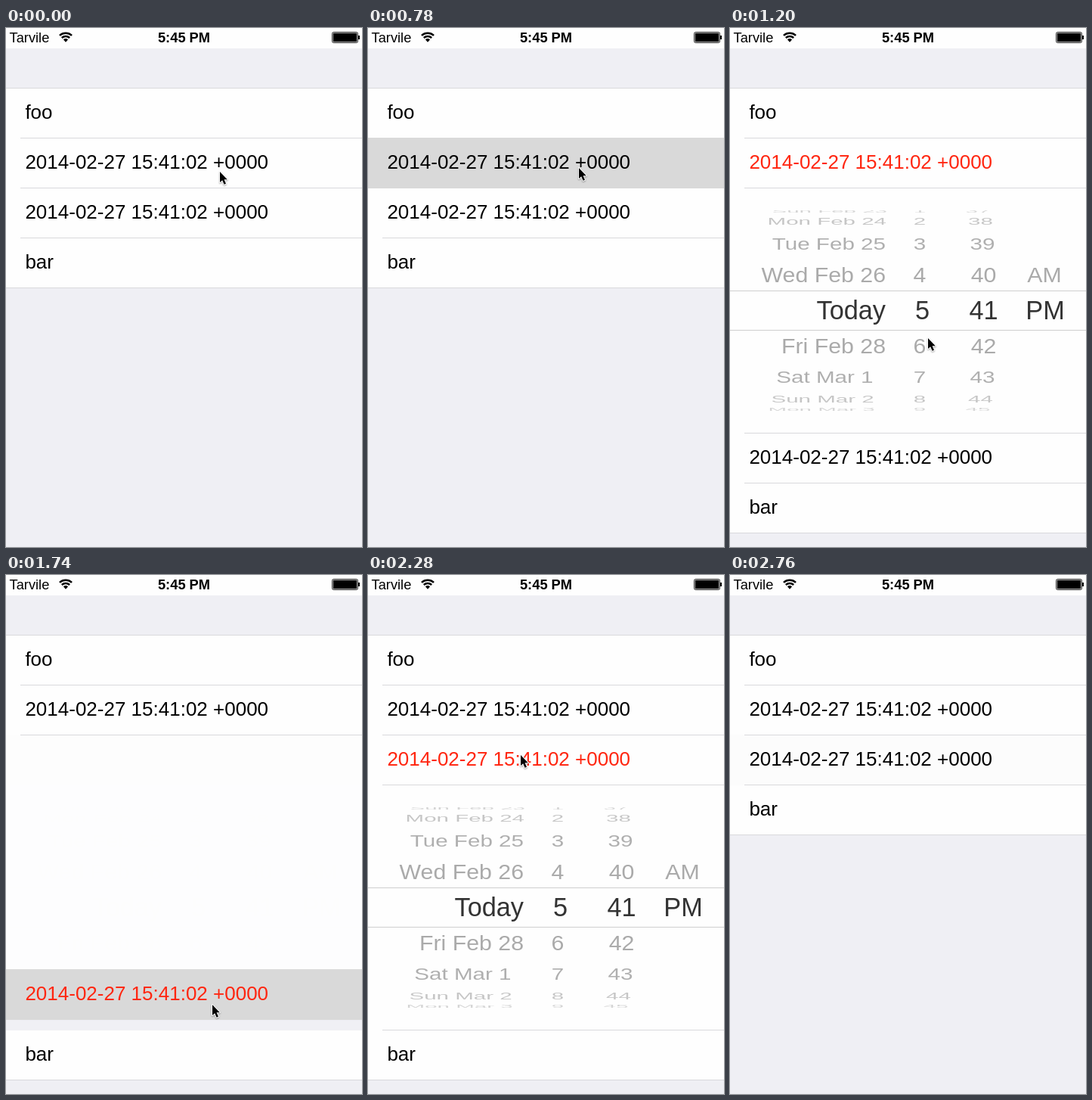
An HTML page with a canvas for the animation above (3.22 s loop, 471 by 686 pixels).

```html
<!DOCTYPE html>
<html lang="en">
<head>
<meta charset="utf-8">
<title>Inline date picker</title>
<style>
  html, body { margin: 0; width: 100%; height: 100%; overflow: hidden; background: #efeff4; }
  canvas { display: block; }
</style>
</head>
<body>
<canvas id="stage" width="471" height="686"></canvas>
<script>
const ctx = document.getElementById('stage').getContext('2d');
const LOOP = 3220, STEP = 60, W = 471, H = 686;
const ROW = 66, PICKER = 324, CELL = '#fefefe', LINE = '#d9d9dc';
const FONT = '"Liberation Sans", Arial, sans-serif';
const DATE = '2014-02-27 15:41:02 +0000';

// Each key is [time, ...values]
const CURSOR = [
  [0, 283, 190], [60, 279, 185], [840, 279, 185], [1200, 262, 410], [1500, 273, 568],
  [1740, 273, 568], [1800, 262, 534], [1860, 240, 426], [2280, 202, 238],
  [2460, 202, 238], [2700, -20, 290]
];
const GLOW_FIRST = [[779, 0], [780, 1], [840, 1], [1140, 0]];
const GLOW_SECOND = [
  [1619, 0], [1620, 1], [1740, 1], [1860, .1], [1920, 0], [2459, 0], [2460, 1], [2760, .05]
];

const WHEEL = [
  ['Sun Feb 23', 1, 37], ['Mon Feb 24', 2, 38], ['Tue Feb 25', 3, 39], ['Wed Feb 26', 4, 40, 'AM'],
  ['Today', 5, 41, 'PM'],
  ['Fri Feb 28', 6, 42], ['Sat Mar 1', 7, 43], ['Sun Mar 2', 8, 44], ['Mon Mar 3', 9, 45]
];
// Indexed by distance from the selected row
const WHEEL_ALPHA = [.8, .33, .31, .22, .16];
const WHEEL_SIZE = [34.3, 30.3, 29.6, 29.5, 29.5];
const MINUTE_X = [335.5, 335.5, 334, 331.5, 328];

function tween(keys, t) {
  const i = keys.findIndex(k => k[0] > t);
  if (i < 0) return keys[keys.length - 1].slice(1);
  if (i === 0) return keys[0].slice(1);
  const a = keys[i - 1], b = keys[i], f = (t - a[0]) / (b[0] - a[0]);
  return a.slice(1).map((v, j) => v + (b[j + 1] - v) * f);
}

function ease(t, start) {
  const x = Math.min(1, Math.max(0, (t - start) / 280));
  return x * x * (3 - 2 * x);
}

function box(x, y, w, h, color) {
  ctx.fillStyle = color;
  ctx.fillRect(x, y, w, h);
}

function text(str, x, y, size, color, align = 'left', weight = '') {
  ctx.font = `${weight} ${size}px ${FONT}`;
  ctx.textAlign = align;
  ctx.fillStyle = color;
  ctx.fillText(str, x, y);
}

function row(label, top, color = '#000', glow = 0, inset = 19) {
  box(0, top, W, ROW, CELL);
  box(inset, top + ROW - 1, W - inset, 1, LINE);
  if (glow) box(0, top - 1, W, ROW + 1, `rgba(217,217,217,${glow})`);
  text(label, 25.4, top + 40, 26, color);
}

function wheelRow([day, hour, minute, half], k, mid) {
  const n = Math.abs(k), angle = k * 20.9 * Math.PI / 180;
  const size = WHEEL_SIZE[n];
  const color = `rgba(0,0,0,${WHEEL_ALPHA[n]})`;
  const put = (str, x, align) => text(str, x, size * .345, size, color, align);
  ctx.save();
  ctx.translate(0, mid + 132 * Math.sin(angle));
  ctx.scale(1, Math.max(.17, Math.cos(angle)));
  const pad = / \d$/.test(day) ? size * .556 : 0;
  put(day, 206 + Math.max(0, n - 2) - pad, 'right');
  put(hour, n ? 251 : 254.5, 'center');
  put(minute, MINUTE_X[n], 'center');
  if (half) put(half, n ? 416 : 417, 'center');
  ctx.restore();
}

function picker(top, alpha, filled = true) {
  if (alpha <= 0) return;
  ctx.save();
  ctx.globalAlpha = alpha;
  box(0, top, W, PICKER, CELL);
  box(19, top + PICKER - 1, W - 19, 1, LINE);
  if (filled) {
    box(0, top + 135, W, 1, '#cfcfcf');
    box(0, top + 187, W, 1, '#cfcfcf');
    ctx.beginPath();
    ctx.rect(0, top + 29, W, 265);
    ctx.clip();
    WHEEL.forEach((item, i) => wheelRow(item, i - 4, top + 161));
  }
  ctx.restore();
}

function statusBar() {
  box(0, 0, W, 27, CELL);
  text('Tarvile', 4.5, 19, 18.3, '#000');
  text('5:45 PM', 235.5, 19, 18.3, '#000', 'center', 'bold');

  const from = -Math.PI * .735, to = -Math.PI * .265;
  ctx.strokeStyle = '#000';
  ctx.lineWidth = 2.5;
  for (const r of [12, 7.7]) {
    ctx.beginPath();
    ctx.arc(79, 18.7, r, from, to);
    ctx.stroke();
  }
  ctx.beginPath();
  ctx.moveTo(79, 18.7);
  ctx.arc(79, 18.7, 4.6, from, to);
  ctx.fill();

  ctx.lineWidth = .8;
  ctx.beginPath();
  ctx.roundRect(431.5, 5.5, 34, 14, 2);
  ctx.stroke();
  box(432.7, 6.7, 31.6, 11.6, '#000');
  box(466, 10, 2, 5, '#000');
}

function cursor(x, y) {
  ctx.save();
  ctx.translate(x, y);
  ctx.beginPath();
  for (const [px, py] of [[0, 0], [0, 14], [3.2, 11.2], [5.6, 16.8], [8, 15.8], [5.6, 10.3], [9.8, 10.3]])
    ctx.lineTo(px, py);
  ctx.closePath();
  ctx.strokeStyle = '#fff';
  ctx.lineWidth = 2;
  ctx.lineJoin = 'round';
  ctx.shadowColor = 'rgba(0,0,0,.35)';
  ctx.shadowBlur = 2;
  ctx.shadowOffsetY = 1;
  ctx.stroke();
  ctx.shadowColor = 'transparent';
  ctx.fillStyle = '#000';
  ctx.fill();
  ctx.restore();
}

function draw(t) {
  const open = ease(t, 860), move = ease(t, 1705), close = ease(t, 2465);
  const red = (from, to) => t >= from && t < to ? '#ff2610' : '#000';

  box(0, 0, W, H, '#efeff4');
  statusBar();
  box(0, 79, W, 1, LINE);

  if (t < 1680) {
    picker(212, open);
  } else {
    picker(278, move * (1 - close));
    picker(212, 1 - move, false);
  }
  row('foo', 80);
  row('bar', 278 + PICKER * (open - close), '#000', 0, 0);
  row(DATE, 146, red(840, 1680), tween(GLOW_FIRST, t)[0]);
  row(DATE, 212 + PICKER * (open - move), red(1680, 2460), tween(GLOW_SECOND, t)[0]);
  cursor(...tween(CURSOR, t));
}

const began = performance.now();
function tick() {
  const t = (performance.now() - began) % LOOP;
  draw(Math.floor(t / STEP) * STEP);
  requestAnimationFrame(tick);
}
tick();
</script>
</body>
</html>
```
